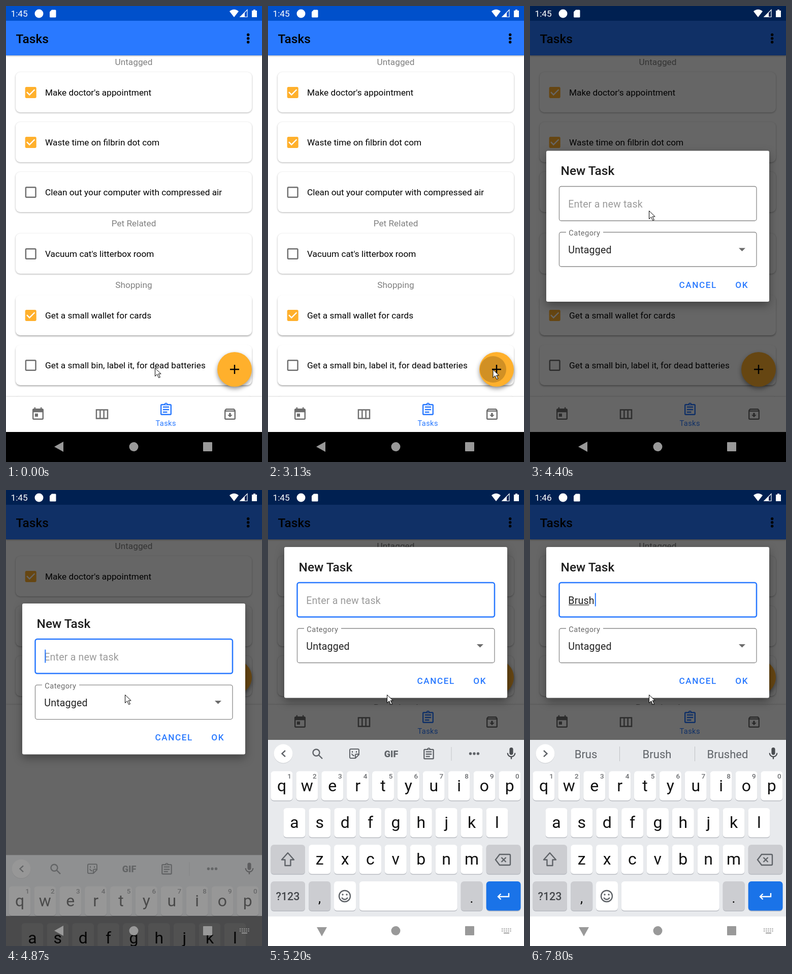
An HTML page for the animation above (8000 ms loop, 504 px wide and 896 px high).

```html
<!DOCTYPE html>
<html lang="en">
<head>
<meta charset="utf-8">
<title>Tasks</title>
<style>
html, body { margin: 0; width: 100%; height: 100%; overflow: hidden; background: #fff; }
svg { display: block; width: 504px; height: 896px; font-family: Roboto, sans-serif; }
.mid { text-anchor: middle; }
.bold { font-weight: 500; }
.body { font-size: 17.25px; }
.input { font-size: 19.6px; letter-spacing: .18px; }
.title { font-size: 24.5px; font-weight: 500; }
.button { font-size: 17.16px; font-weight: 500; letter-spacing: 1.53px; fill: #2979ff; }
.line { fill: none; stroke: #5f6368; stroke-width: 2.4; }
.word { font-size: 22px; fill: #5f6368; text-anchor: middle; }
.icon { fill-rule: evenodd; }
</style>
</head>
<body>
<svg id="stage" viewBox="0 0 504 896"></svg>
<script>
const LOOP = 8000;
const BLUE = '#2979ff', AMBER = '#ffb02c', GREY = '#6e6e6e', INK = '#5f6368';

const text = (x, y, s, cls, extra = '') => `<text x="${x}" y="${y}" class="${cls}" ${extra}>${s}</text>`;
const rect = (x, y, w, h, fill, r = 0, extra = '') =>
  `<rect x="${x}" y="${y}" width="${w}" height="${h}" fill="${fill}" rx="${r}" ${extra}/>`;
const circle = (x, y, r, fill, extra = '') => `<circle cx="${x}" cy="${y}" r="${r}" fill="${fill}" ${extra}/>`;
const path = (d, extra = '') => `<path d="${d}" ${extra}/>`;
const group = (id, s, extra = '') => `<g id="${id}" ${extra}>${s}</g>`;
const shadow = (dy, blur, alpha) => `style="filter:drop-shadow(0 ${dy}px ${blur}px rgba(0,0,0,${alpha}))"`;
// 24-unit icon centred on a point
const icon = (x, y, d, fill, scale = 1.226) =>
  path(d, `class="icon" fill="${fill}" transform="translate(${x} ${y}) scale(${scale}) translate(-12 -12)"`);

const BOX = 'M19 3H5c-1.1 0-2 .9-2 2v14c0 1.1.9 2 2 2h14c1.1 0 2-.9 2-2V5c0-1.1-.9-2-2-2z';
const ICONS = {
  checked: BOX + 'M10 17l-5-5 1.4-1.4 3.6 3.6 7.6-7.6L19 8z',
  unchecked: BOX + 'M5 5v14h14V5z',
  day: 'M19 3h-1V1h-2v2H8V1H6v2H5c-1.1 0-2 .9-2 2v14c0 1.1.9 2 2 2h14c1.1 0 2-.9 2-2V5c0-1.1-.9-2-2-2zm0 16H5V9h14zM7 11h5v5H7z',
  columns: 'M2 4h20v16H2zM4 6v12h4V6zM10 6v12h4V6zM16 6v12h4V6z',
  clipboard: 'M7 15h7v2H7zM7 11h10v2H7zM7 7h10v2H7zM19 3h-4.2C14.4 1.8 13.3 1 12 1s-2.4.8-2.8 2H5c-1.1 0-2 .9-2 2v14c0 1.1.9 2 2 2h14c1.1 0 2-.9 2-2V5c0-1.1-.9-2-2-2zM12 2.7a.8.8 0 1 1 0 1.6a.8.8 0 1 1 0-1.6zM19 19H5V5h14z',
  archive: 'M20.5 5.2l-1.4-1.7C18.9 3.2 18.5 3 18 3H6c-.5 0-.9.2-1.2.6L3.5 5.2C3.2 5.6 3 6 3 6.5V19c0 1.1.9 2 2 2h14c1.1 0 2-.9 2-2V6.5c0-.5-.2-.9-.5-1.3zM6.2 5h11.6l.8 1H5.4zM5 19V8h14v11zM13.4 10h-2.9v3H8l4 4 4-4h-2.6z',
  mic: 'M12 2a3 3 0 0 1 3 3v6a3 3 0 0 1-6 0V5a3 3 0 0 1 3-3zM5 11h1.8a5.2 5.2 0 0 0 10.4 0H19a7 7 0 0 1-6 6.9V21h-2v-3.1A7 7 0 0 1 5 11z'
};

// Card shadows grow longer down the screen
function task(y, label, done) {
  return rect(19, y - 40, 465, 79, '#fff', 9, shadow(1 + y / 500, 1.8, .32)) +
    icon(48.7, y, done ? ICONS.checked : ICONS.unchecked, done ? AMBER : GREY) +
    text(77, y + 6, label, 'body');
}
const heading = (y, s) => text(251.5, y + 6, s, 'body mid', 'fill="#808080"');

const list = rect(0, 0, 504, 896, '#fff') +
  heading(110, 'Untagged') +
  task(170, "Make doctor's appointment", true) +
  task(268, 'Waste time on filbrin dot com', true) +
  task(366, 'Clean out your computer with compressed air') +
  heading(427, 'Pet Related') +
  task(487, "Vacuum cat's litterbox room") +
  heading(548, 'Shopping') +
  task(608, 'Get a small wallet for cards', true) +
  task(706, 'Get a small bin, label it, for dead batteries') +
  task(805, '');

const header = rect(0, 0, 504, 97, BLUE, 0, shadow(1, 1.5, .35)) +
  rect(0, 0, 504, 29, '#0050cb') +
  text(19.6, 73, 'Tasks', 'title') +
  [56.5, 63.7, 71].map(y => circle(476.7, y, 2.7, '#000')).join('');

const footer = group('footer',
  rect(0, 768, 504, 500, '#fff', 0, shadow(-1, 1, .14)) +
  icon(63, 802, ICONS.day, GREY) +
  icon(189, 802, ICONS.columns, GREY) +
  icon(315, 793, ICONS.clipboard, BLUE) +
  icon(441, 802, ICONS.archive, GREY) +
  text(314.7, 824.5, 'Tasks', 'mid', `font-size="14.7" letter-spacing=".35" fill="${BLUE}"`) +
  circle(450, 714, 34, AMBER, shadow(4, 4, .42)) +
  '<circle id="ripple"/>' +
  path('M441 714h18M450 705v18', 'stroke="#000" stroke-width="2.4"'));

const status = text(9.5, 21, '1:45', 'body', 'id="clock" fill="#fff"') +
  group('signals',
    circle(65, 15, 8.5, '#fff') +
    path('M90 7.5h7q1.5 0 1.5 1.5v12q0 1.5-1.5 1.5h-9.5q-1.5 0-1.5-1.5v-9.5z') +
    path('M440 10.5Q449 3 458 10.5L449 22z') +
    path('M475 7.5v14h-14z', 'fill="none" stroke="#fff" stroke-width="1.2"') +
    path('M470 12.5V22h-9z') +
    path('M484 9h3V7h4v2h3v13h-10z'), 'fill="#fff"');

const dialog = group('dialog',
  rect(32, 284.5, 439, 296.5, '#fff', 3, shadow(7, 9, .35)) +
  text(60.5, 332, 'New Task', 'title', 'fill="#1f1f1f"') +
  rect(57.5, 354.5, 388.5, 67.5, 'none', 4, 'id="field"') +
  text(75.3, 396, 'Enter a new task', 'input', 'id="hint" fill="#9b9b9b"') +
  text(75.3, 396, '', 'input', 'id="typed" fill="#222"') +
  rect(76, 397.8, 0, 1.2, '#222', 0, 'id="underline"') +
  rect(76, 375, 2, 26, BLUE, 0, 'id="caret"') +
  rect(57.5, 444.5, 388.5, 67.5, 'none', 4, 'stroke="#8a8a8a" stroke-width="1.3"') +
  rect(71, 442, 73, 5, '#fff') +
  text(76.3, 451, 'Category', '', 'font-size="14.7" letter-spacing=".4" fill="#6b6b6b"') +
  text(75.3, 486, 'Untagged', 'input', 'fill="#222"') +
  path('M411 475.5h13l-6.5 6.5z', 'fill="#6b6b6b"') +
  text(293.6, 553.5, 'CANCEL', 'button') + text(404.3, 553.5, 'OK', 'button'));

// Keyboard
const PITCH = 49.87, ROWS = [552.5, 625, 697, 769];
function key(x, row, w = 43, fill = '#fff') {
  return rect(x, ROWS[row] + 1, w, 58, '#b9bcc2', 6) + rect(x, ROWS[row], w, 57.5, fill, 6);
}
function letters(s, x0, row) {
  return [...s].map((c, i) => {
    const x = x0 + i * PITCH;
    const digit = row ? '' : text(x + 36.5, 567, (i + 1) % 10, 'mid bold', 'font-size="13.5" fill="#6b6d70"');
    return key(x, row) + text(x + 21.5, ROWS[row] + 39.3, c, 'mid', 'font-size="32" fill="#111"') + digit;
  }).join('');
}
const DARK_KEY = '#cccdd1';
const tools = group('tools',
  path('M34 512l-6.5 6 6.5 6', 'class="line"') +
  circle(95, 516, 6.5, 'none', 'class="line"') + path('M100 521l7 7', 'class="line"') +
  path('M163 509h14q2 0 2 2v9l-7 7h-9q-2 0-2-2v-14q0-2 2-2zM179 519h-5q-2 0-2 2v6M165 518q1 4 5 4M166 513v3M174 513v3', 'class="line" style="stroke-width:2"') +
  text(242.5, 524.5, 'GIF', 'mid', `font-size="18" font-weight="900" fill="${INK}"`) +
  icon(316.5, 519, ICONS.clipboard, INK, 1.15) +
  rect(360.5, 505, 1, 27, '#c3c5c9') +
  [398.5, 406, 413.5].map(x => circle(x, 518, 2.7, INK)).join(''));
const words = group('words',
  path('M27 512l6.5 6-6.5 6', 'class="line"') +
  [110, 250, 389].map(x => text(x, 526.5, '', 'word')).join('') +
  rect(176, 504, 1, 29, '#bfc1c5') + rect(324, 504, 1, 29, '#bfc1c5'));
const keyboard = group('keyboard',
  rect(0, 491, 504, 347, '#e8eaed') + rect(0, 838, 504, 58, '#fff') +
  circle(30, 519, 18.5, '#c9cbcf') + circle(30, 518, 18.5, '#fff') + tools + words +
  icon(479, 518, ICONS.mic, '#4a4d51', 1.2) +
  letters('qwertyuiop', 5.5, 0) + letters('asdfghjkl', 30.5, 1) + letters('zxcvbnm', 80.2, 2) +
  key(5.5, 2, 67.5, DARK_KEY) + key(429.7, 2, 67.8, DARK_KEY) +
  path('M39 713L27 726.5h6.5V738h11v-11.5H51z', 'class="line" stroke-linejoin="round"') +
  path('M456 716h19q2 0 2 2v17q0 2-2 2h-19l-8-10.5zM459.5 722l9 9M468.5 722l-9 9', 'class="line"') +
  key(5.5, 3, 67.5, DARK_KEY) + key(80.2, 3, 43, DARK_KEY) + key(130, 3) + key(179.8, 3, 193) +
  key(379.7, 3, 43, DARK_KEY) + key(429.7, 3, 67.8, '#1a73e8') +
  text(39, 805.5, '?123', 'mid bold', 'font-size="21.5" fill="#44474b"') +
  text(101.5, 811, ',', 'mid', 'font-size="26"') + text(401, 811, '.', 'mid', 'font-size="26"') +
  circle(151, 798, 11, 'none', 'class="line"') +
  path('M145 801q6 7 12 0', 'class="line"') + circle(147, 795, 1.7, INK) + circle(155, 795, 1.7, INK) +
  path('M474 792v7h-21M458.5 793.5l-5.5 5.5 5.5 5.5', 'fill="none" stroke="#fff" stroke-width="2.4"'));

const buttons = group('buttons',
  path('M95 866l18-10v20z', 'id="back"') +
  circle(251.5, 866, 9, '#999') + rect(388, 857, 18, 18, '#999', 1) +
  group('switcher',
    path('M460 862.5h19M460 866.5h19', 'stroke="#999" stroke-width="2.2" stroke-dasharray="2.2 1.9"') +
    rect(464, 869.5, 11, 2, '#999')), 'fill="#999"');

const pointer = path('M0 0V16l4-4 3.2 7 2.7-1.2-3.2-6.5h5z', 'id="pointer" fill="#fff" stroke="#000" stroke-width="1"');

document.getElementById('stage').innerHTML = list + footer + header +
  rect(0, 0, 504, 837, '#000', 0, 'id="dim"') + status + dialog +
  rect(0, 837, 504, 59, '#000') + keyboard + buttons + pointer;

const $ = id => document.getElementById(id);
const set = (id, attrs) => { for (const k in attrs) $(id).setAttribute(k, attrs[k]); };
const show = (id, on) => set(id, { visibility: on ? 'visible' : 'hidden' });
const part = (t, a, b) => Math.min(1, Math.max(0, (t - a) / (b - a)));
const smooth = p => p * p * (3 - 2 * p);
const out = p => 1 - (1 - p) ** 2;
const mix = (a, b, p) => a + (b - a) * p;

// [start, typed letters, underlined letters, suggestions]
const TYPING = [
  [0, 0, 0, null],
  [6330, 1, 0, null],
  [6530, 1, 1, ['B', 'But', 'Being']],
  [6670, 2, 1, ['B', 'But', 'Being']],
  [6730, 2, 2, ['Br', 'Bro', 'Brown']],
  [6870, 3, 2, ['Br', 'Bro', 'Brown']],
  [7130, 3, 3, ['Bru', 'Brush', 'Brunch']],
  [7470, 4, 3, ['Bru', 'Brush', 'Brunch']],
  [7600, 4, 4, ['Brus', 'Brush', 'Brushed']],
  [7800, 5, 4, ['Brus', 'Brush', 'Brushed']]
];

function draw(t) {
  // Pointer
  const a = smooth(part(t, 1420, 2000)), b = smooth(part(t, 3820, 4400));
  const x = mix(mix(293.5, 443, a), 234.5, b), y = mix(mix(711.5, 714.5, a), 402.5, b);
  set('pointer', { transform: `translate(${x} ${y})` });

  // Button press and dialog entrance
  const r = part(t, 3130, 3330);
  set('ripple', { cx: mix(443, 450, r), cy: 714, r: mix(26, 34, r),
    opacity: t < 3130 ? 0 : .18 * (1 - part(t, 3300, 3460)) });
  set('dim', { opacity: .6 * out(part(t, 3320, 3530)) });
  const d = out(part(t, 3310, 3460)), scale = mix(.9, 1, d);
  const lift = -172.5 * out(part(t, 4790, 5200));
  set('dialog', { opacity: d,
    transform: `translate(251.5 ${432.5 + lift}) scale(${scale}) translate(-251.5 -432.5)` });

  // Focus and keyboard entrance
  const focus = t >= 4600;
  set('field', { stroke: focus ? BLUE : '#8a8a8a', 'stroke-width': focus ? 2.5 : 1.3 });
  set('footer', { transform: `translate(0 ${t < 4730 ? 0 : -346})` });
  const k = out(part(t, 4770, 5170));
  set('keyboard', { opacity: k ** 1.4, transform: `translate(0 ${405 * (1 - k)})` });
  set('back', { transform: `rotate(${-90 * smooth(part(t, 4880, 5130))} 106 866)` });
  show('switcher', t >= 4800);

  // Typing
  const [, typed, marked, picks] = TYPING.findLast(s => t >= s[0]);
  const field = $('typed');
  field.textContent = 'Brush'.slice(0, typed);
  const width = n => n ? field.getSubStringLength(0, n) : 0;
  set('underline', { width: width(marked) });
  set('caret', { x: 76.3 + width(typed) });
  show('caret', focus && t < 5200 || t >= 5730 && t < 6200 || t >= 6330);
  show('hint', !typed);
  show('tools', !picks);
  show('words', picks);
  document.querySelectorAll('.word').forEach((w, i) => w.textContent = picks ? picks[i] : '');
  $('clock').textContent = t < 7700 ? '1:45' : '1:46';
}

const start = performance.now();
function tick() {
  draw((performance.now() - start) % LOOP);
  requestAnimationFrame(tick);
}
tick();
</script>
</body>
</html>
```
